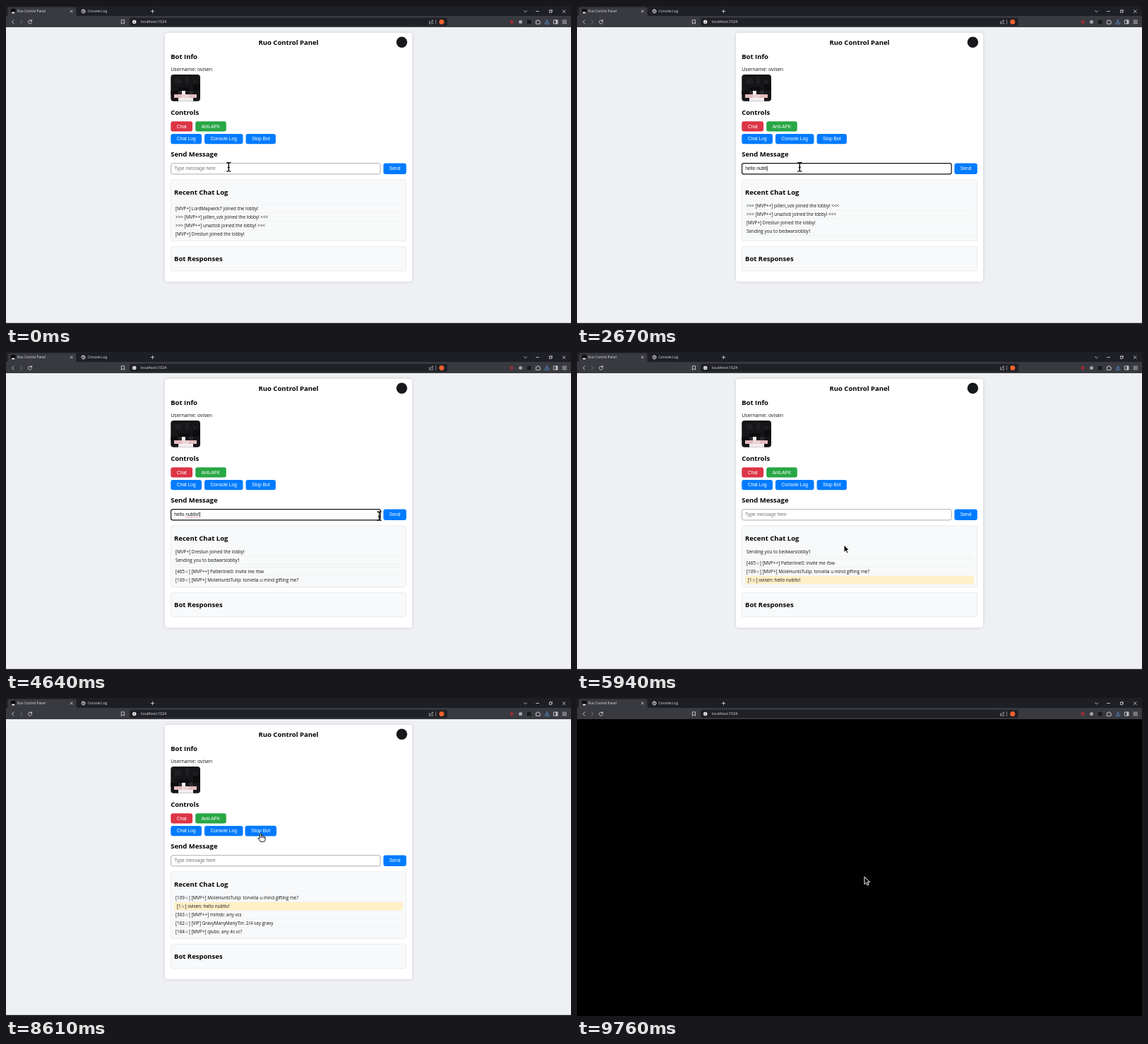
An HTML page that plays this animation: 800 px wide and 450 px high, repeating every 9.82 s.

```html
<!DOCTYPE html>
<html lang="en">
<head>
<meta charset="utf-8">
<title>Control Panel</title>
<style>
  html, body { margin: 0; width: 100%; height: 100%; overflow: hidden; background: #eef0f3; }
  svg { display: block; width: 800px; height: 450px; }
  text { font-family: "Open Sans", "Noto Sans", sans-serif; white-space: pre; }
  .ui { fill: #e4e4e7; font-size: 4.75px; }
  .h { font-size: 9.5px; font-weight: 700; fill: #000; }
  .user { font-size: 7.05px; fill: #111; }
  .row { font-size: 6.36px; fill: #111; }
  .star { font-family: "DejaVu Sans", sans-serif; }
  .arial { font-family: "Liberation Sans", Arial, sans-serif; font-size: 6.67px; }
  .btn text { fill: #fff; text-anchor: middle; }
  .btn { transform-box: fill-box; transform-origin: center; }
  .box { fill: #f8f9fa; stroke: #dddfe3; stroke-width: .6; }
  .icon { fill: none; stroke: #dedee2; stroke-width: .8; stroke-linecap: round; stroke-linejoin: round; }
  .drop { filter: drop-shadow(0 0 2px rgba(0, 0, 0, .14)); }
</style>
</head>
<body>
<svg viewBox="0 0 800 450">
  <rect width="800" height="450" fill="#eef0f3"/>

  <rect id="card" class="drop" x="225" y="38" width="350" height="352" rx="4" fill="#fff"/>
  <text class="h" x="400" y="55" text-anchor="middle">Ruo Control Panel</text>
  <circle cx="560.4" cy="51.2" r="7.7" fill="#17181c"/>
  <text class="h" x="233.2" y="75">Bot Info</text>
  <text class="user" x="233.2" y="91.7">Username: ovisen</text>

  <clipPath id="face"><rect x="233.3" y="97" width="41.7" height="37.8" rx="4"/></clipPath>
  <g clip-path="url(#face)" shape-rendering="crispEdges">
    <path fill="#161618" d="M233 97h42v38h-42z"/>
    <path fill="#1f1f22" d="M238.5 102h10.4v8h-10.4zM254 99.500h5v10h-5zM264.500 105h5v10h-5z"/>
    <path fill="#0d0d0f" d="M243.700 115h16v5h-16zM233 120h10.500v5H233zM264.500 110h10v10h-10z"/>
    <path fill="#2b292c" d="M243.700 120h5.200v5h-5.200zM259.300 120h5.200v5h-5.200z"/>
    <path fill="#e3bcbe" d="M238.500 125h31.300v4.800h-31.300z"/>
    <path fill="#f3eef0" d="M248.900 120h5.200v5h-5.200zM243.700 129.800h20.800v5.200h-20.800z"/>
    <path fill="#ecd3d4" d="M248.900 125h10.400v4.800h-10.400z"/>
  </g>

  <text class="h" x="233.2" y="153.500">Controls</text>
  <g id="buttons"></g>
  <text class="h" x="233.2" y="213">Send Message</text>
  <rect id="field" x="233.6" y="222.700" width="296.6" height="15.200" rx="2.600" fill="#fff"/>
  <text id="typed" class="arial" x="238.300" y="232.300"></text>
  <path id="spell" fill="none" stroke="#c8423c" stroke-width=".7" stroke-dasharray=".8 .5"/>
  <rect id="caret" y="226.300" width=".7" height="7.400" fill="#111"/>

  <rect id="log" class="box" x="233.500" y="246" width="333" height="86.500" rx="2.500"/>
  <text class="h" x="238" y="267.400">Recent Chat Log</text>
  <g id="rows"></g>
  <g id="answers">
    <rect class="box" x="233.500" y="340.300" width="333" height="34.500" rx="2.500"/>
    <text class="h" x="238" y="361.400">Bot Responses</text>
  </g>
  <rect y="448.700" width="800" height="1.300" fill="#08080a"/>
  <rect id="dark" y="30" width="800" height="420"/>

  <rect width="800" height="15" fill="#1e1f25"/>
  <rect y="14" width="800" height="16" fill="#393a40"/>
  <path fill="#393a40" d="M0 14.500q2.500 0 2.500-2.500V4q0-2.500 2.500-2.500h92q2.500 0 2.500 2.500v8q0 2.500 2.500 2.500z"/>
  <rect x="175" y="16.800" width="450" height="11.400" rx="2.500" fill="#202127"/>
  <path fill="#0c0c0e" d="M7 4h6.500v6.500H7z"/>
  <path fill="#efe3e5" d="M8 8.800h4.500v1.700H8zM9.500 8h1v1h-1z"/>
  <text class="ui" x="16" y="9.100">Ruo Control Panel</text>
  <text class="ui" x="115.500" y="9.100" style="font-size:4.900px">Console Log</text>
  <text class="ui" x="191" y="24.300" style="font-size:5.400px">localhost:1024</text>
  <g class="icon">
    <path d="M91.200 6l3 3m0-3l-3 3M205.300 7.500h4.400m-2.200-2.200v4.400M733.500 6.700l2 2 2-2M750.500 7.500h4M788.300 5.700l3.800 3.800m0-3.800l-3.800 3.800"/>
    <rect x="769.300" y="6.300" width="3.200" height="3.200" rx=".6"/>
    <path d="M770.200 5.300h3.300v3.300" stroke-width=".5"/>
    <circle cx="109.500" cy="7.500" r="2.600"/>
    <path d="M107.500 6.500l2 1 .5 2M109 5.200l2 1.500" stroke-width="1"/>
    <path d="M11 20l-2.700 2.500 2.700 2.500"/>
    <path d="M20.500 20l2.700 2.500-2.700 2.500" stroke="#85868c"/>
    <path d="M36 20.900a2.600 2.600 0 1 0 .6 2M36.500 19.500v1.900h-1.900"/>
    <path d="M163.700 19.800h3.800v5.400l-1.900-1.500-1.900 1.500z"/>
    <path d="M599.500 21.500v3.500h5v-1.500M601 23.500q.5-2.700 3.500-2.700m-1.300-1.300l1.500 1.300-1.500 1.300" stroke-width=".6"/>
    <path d="M608.500 19.500v6" stroke-width=".5"/>
    <path d="M750.800 21h1.500q0-1.500 1-1.500t1 1.500h1.500v1.500q1 0 1 .8t-1 .8v1.300h-5z"/>
    <path d="M766 19.300v3.800m-1.700-1.600l1.700 1.700 1.700-1.700M763.300 23.700v1.500h5.400v-1.500" stroke="#5b9bec"/>
    <rect x="775.700" y="20" width="5.400" height="5"/>
    <path d="M779.500 20.500v4" stroke-width="1.800"/>
    <path d="M788 20.300h5.500m-5.500 2.200h5.500m-5.500 2.200h5.500"/>
  </g>
  <circle cx="181.700" cy="22.500" r="2.700" fill="#e6e6e9"/>
  <path d="M181.700 22v2m0-3.200v.5" stroke="#26272c" stroke-width=".7"/>
  <circle cx="616.800" cy="22.500" r="3.500" fill="#f2602c"/>
  <circle cx="716" cy="22.500" r="2.400" fill="#a32b33"/>
  <circle cx="728.500" cy="22.500" r="2.500" fill="#a5a6ab"/>
  <rect x="738" y="19.800" width="5.500" height="5.500" fill="#17181c"/>

  <g id="cursor" stroke-linejoin="round">
    <path id="beam" d="M-3-6Q-.5-6 0-5Q.5-6 3-6M0-5V5.500M-3 6.500Q-.5 6.500 0 5.500Q.5 6.500 3 6.500M-1.500 1h3" fill="none" stroke="#000" stroke-width="1.300"/>
    <path id="arrow" d="M0 0V10.600L2.500 8.300L4.200 12L6 11.200L4.400 7.600H7.600Z" stroke="#fff" stroke-width="1"/>
    <path id="hand" d="M-1 .5Q0-.7 1 .5V4.300Q2-.0 3 4.600Q4.200 3.500 5 5Q6.600 4.200 6.600 6V8.500Q6.300 10 5.400 11.800H-.2Q-1 9.500-3.500 7.500Q-3.900 5.700-1 7.200ZM1 4.300V6.500M3 4.800V6.700M5 5.200V7" fill="#fff" stroke="#000" stroke-width=".9"/>
  </g>
</svg>
<script>
const LOOP = 9820, FOCUS = 700, SENT = 5150, STOPPED = 9400;
const WORD = 'nubtiv', MESSAGE = `hello ${WORD}!`;
const LAST_KEY = 3200;
const $ = id => document.getElementById(id);

// [arrival time, text]; an empty line is a thin row
const chat = [
  [0, ''],
  [0, '[MVP+] LordMapwick7 joined the lobby!'],
  [0, '>>> [MVP++] pillen_vzk joined the lobby! <<<'],
  [0, '>>> [MVP++] unaztob joined the lobby! <<<'],
  [0, '[MVP+] Drestun joined the lobby!'],
  [2300, 'Sending you to bedwarslobby1'],
  [2300, ''],
  [3400, '[465☆] [MVP++] Patterline0: invite me rbw'],
  [4200, '[109☆] [MVP+] MoleHuntsTulip: torvella u mind gifting me?'],
  [5400, `[1☆] ovisen: ${MESSAGE}`],
  [7300, '[363☆] [MVP++] mirteb: any vcs'],
  [8150, '[162☆] [VIP] GravyManyManyTin: 2/4 say gravy'],
  [8400, '[164☆] [MVP+] qlubs: any 4s vc?']
];

// time, x, y of the pointer's hot spot
const path = [
  [0, 315.3, 227.5], [3700, 315.3, 227.5], [4640, 528.5, 232], [4950, 550, 231],
  [5250, 550, 231], [5850, 378, 273], [7700, 378, 273], [8450, 360.500, 191.500],
  [9100, 360.500, 191.500], [9700, 407, 253], [LOOP, 407, 253]
];

const blue = '#007bff';
const buttons = [
  ['Chat', 233.3, 163.2, 30.8, '#dc3545'],
  ['Anti-AFK', 268.2, 163.2, 43.6, '#28a745'],
  ['Chat Log', 233.3, 181, 43.7, blue],
  ['Console Log', 281, 181, 54.5, blue],
  ['Stop Bot', 339.6, 181, 42.3, blue],
  ['Send', 534.4, 222.5, 32.4, blue, 15.4]
].map(([label, x, y, w, color, h = 14.2]) => ({ label, x, y, w, h, color }));

$('buttons').innerHTML = buttons.map(b => `<g class="btn">
  <rect x="${b.x}" y="${b.y}" width="${b.w}" height="${b.h}" rx="3" fill="${b.color}"/>
  <text class="arial" x="${b.x + b.w / 2}" y="${b.y + b.h / 2 + 2.2}">${b.label}</text></g>`).join('');
const buttonNodes = [...$('buttons').children];

const field = { x: 233.3, y: 222.5, w: 297, h: 15.6 };
const inside = (b, x, y) => x >= b.x && x <= b.x + b.w && y >= b.y && y <= b.y + b.h;
const show = (id, on) => { $(id).style.display = on ? '' : 'none'; };
const escape = s => s.replace(/</g, '&lt;').replace(/>/g, '&gt;');

function pointer(t) {
  const i = path.findIndex(p => p[0] > t);
  const [t0, x0, y0] = path[i - 1], [t1, x1, y1] = path[i];
  const k = (t - t0) / (t1 - t0), e = k * k * (3 - 2 * k);
  return [x0 + (x1 - x0) * e, y0 + (y1 - y0) * e];
}

let shown = 0;
function drawLog(t) {
  const count = chat.filter(m => m[0] <= t).length;
  if (count === shown) return;
  shown = count;
  let y = 277;
  const lines = chat.slice(count - 5, count).map(([, text], i) => {
    const h = text ? 12 : 4, own = text.startsWith('[1☆]');
    let out = own ? `<rect x="238" y="${y}" width="324" height="11.7" fill="#fff0c8"/>` : '';
    const body = escape(text).replace('☆', '<tspan class="star">☆</tspan>');
    out += `<text class="row" x="${own ? 242 : 240}" y="${y + 8.3}">${body}</text>`;
    y += h;
    if (i < 4) out += `<path d="M238 ${y - .3}h324" stroke="#e9eaed" stroke-width=".5"/>`;
    return out;
  });
  $('rows').innerHTML = lines.join('');
  const grow = y - 329;
  $('card').setAttribute('height', 352 + grow);
  $('log').setAttribute('height', 86.5 + grow);
  $('answers').setAttribute('transform', `translate(0 ${grow})`);
}

const keyTime = i => i === MESSAGE.length - 1 ? LAST_KEY : 1470 + i * 112;

function drawField(t) {
  const focused = t >= FOCUS && t < SENT;
  const keys = [...MESSAGE].map((c, i) => keyTime(i)).filter(k => k <= t);
  const text = focused ? MESSAGE.slice(0, keys.length) : '';
  const typed = $('typed');
  const label = text || 'Type message here';
  if (typed.textContent !== label) typed.textContent = label;
  typed.setAttribute('fill', text ? '#111' : '#777');
  $('field').setAttribute('stroke', focused ? '#101114' : '#97989d');
  $('field').setAttribute('stroke-width', focused ? 1.2 : .8);

  const since = t - Math.max(FOCUS, ...keys);
  show('caret', focused && since % 1060 < 530);
  $('caret').setAttribute('x', 238.5 + (text ? typed.getComputedTextLength() : 0));

  const done = text === MESSAGE;
  show('spell', done);
  if (done) {
    const start = typed.getSubStringLength(0, 6), w = typed.getSubStringLength(6, WORD.length);
    $('spell').setAttribute('d', `M${238.3 + start} 233.7h${w}`);
  }
}

function drawPointer(t) {
  const [x, y] = pointer(t), live = t < STOPPED;
  const hovered = buttons.findIndex(b => live && inside(b, x, y));
  const overField = live && inside(field, x, y);
  buttonNodes.forEach((n, i) => { n.style.transform = i === hovered ? 'scale(1.05)' : ''; });
  show('hand', hovered >= 0);
  show('beam', overField);
  show('arrow', hovered < 0 && !overField);
  $('cursor').setAttribute('transform', `translate(${x} ${y})`);
}

function frame() {
  const t = performance.now() % LOOP;
  drawLog(t);
  drawField(t);
  drawPointer(t);
  show('dark', t >= STOPPED);
  requestAnimationFrame(frame);
}
frame();
</script>
</body>
</html>
```
